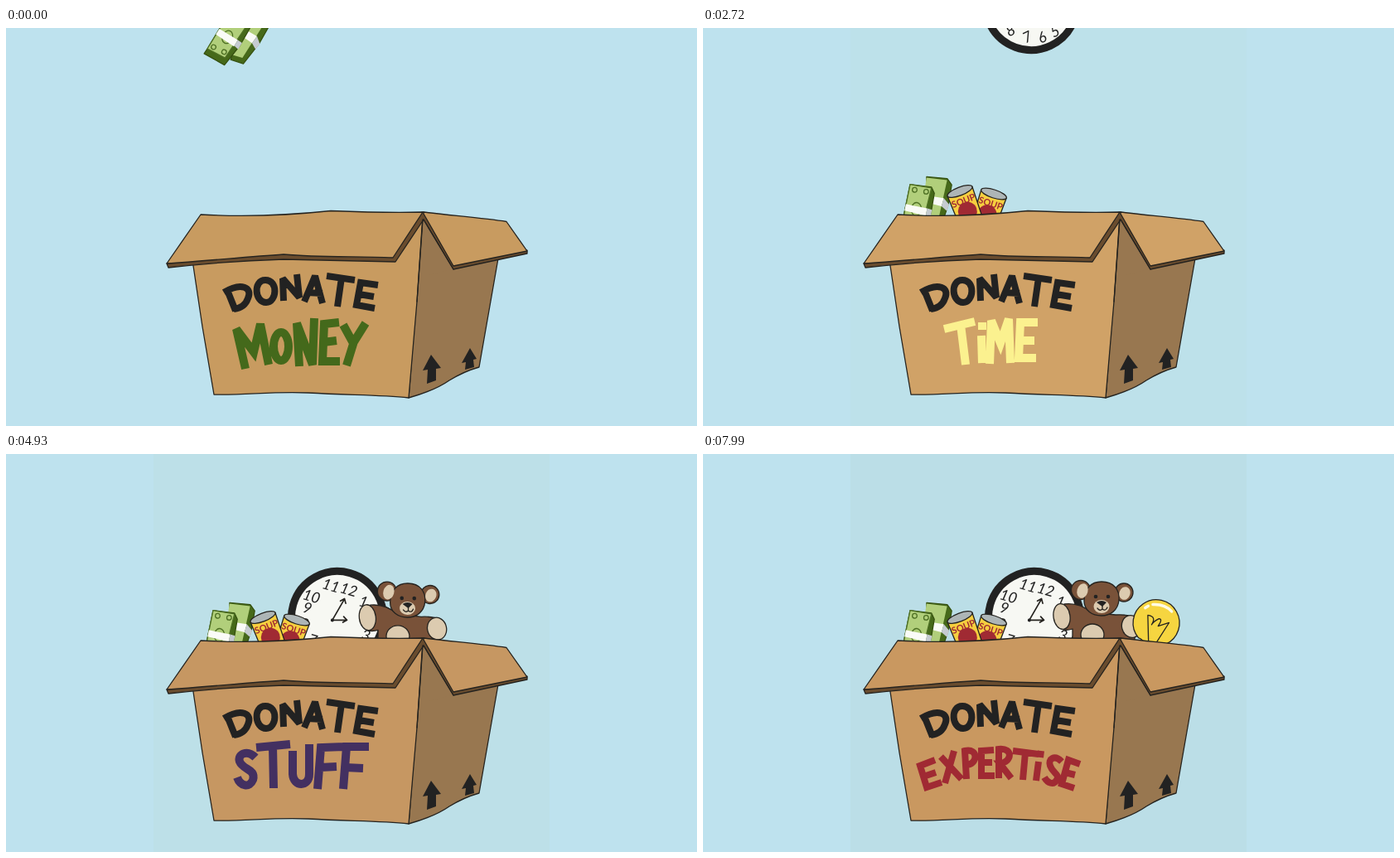
These frames come from a looping animation (834 by 480 pixels, 8160 ms). An HTML page:

```html
<!DOCTYPE html>
<html lang="en">
<head>
<meta charset="utf-8">
<title>Donate</title>
<style>
  html, body { margin: 0; width: 100%; height: 100%; overflow: hidden; background: #bee2ee; }
  svg { display: block; width: 834px; height: 480px; }
  .ink { stroke: #25231f; stroke-width: 1.3; stroke-linejoin: round; }
  .line { fill: none; stroke: #25231f; stroke-width: 1.3; stroke-linecap: round; stroke-linejoin: round; }
  .word { fill: none; stroke-linejoin: miter; stroke-miterlimit: 3; }
  .soup { font: 700 11px Lato, "Open Sans", sans-serif; fill: #a02a33; text-anchor: middle; }
  .digits { font: italic 400 18px Lato, "Open Sans", sans-serif; fill: #222; text-anchor: middle; }
</style>
</head>
<body>
<svg viewBox="0 0 834 480">
  <defs>
    <g id="can">
      <path class="ink" fill="#f6cf3f" d="M-16 0L-15 42Q0 49 14 43L16 0Z"/>
      <ellipse class="ink" cx="0" cy="0" rx="16" ry="5" fill="#adb5b6"/>
      <circle cx="0" cy="26" r="11.5" fill="#a02a33"/>
      <text class="soup" y="16">SOUP</text>
    </g>
  </defs>

  <rect width="834" height="480" fill="#bee2ee"/>
  <rect id="tint" x="178" width="478" height="480"/>

  <g id="money">
    <path class="ink" style="stroke:#35500f" fill="#46691a" d="M266 129L291 129L297 136L295 160L288 190L272 192Z"/>
    <path fill="#b1cf7b" d="M266 130L291 131L284 184L271 186L264 160Z"/>
    <path fill="#fafbf7" d="M276 152L289 153L287 163L275 161Z"/>
    <path fill="#c5cbd0" d="M289 153L296 160L294 168L287 163Z"/>
    <path class="ink" style="stroke:#35500f" fill="#46691a" d="M247 140L273 141L277 148L275 172L268 201L240 199L241 192Z"/>
    <path class="line" style="stroke:#4e7024;fill:#b1cf7b" d="M247 140L273 142L265 193L241 192Z"/>
    <g class="line" style="stroke:#4e7024">
      <circle cx="253" cy="146" r="2.8"/><circle cx="267" cy="147" r="2.8"/>
      <circle cx="247" cy="187" r="2.8"/><circle cx="261" cy="187" r="2.8"/>
      <ellipse cx="257" cy="169" rx="6" ry="8"/>
    </g>
    <path fill="#fafbf7" d="M244 164L270 167L269 176L243 172Z"/>
    <path fill="#c5cbd0" d="M270 167L276 168L275 177L269 175Z"/>
  </g>

  <g id="clock">
    <circle cx="398" cy="139" r="55.5" fill="#f7f8f3" stroke="#222" stroke-width="9"/>
    <g id="dial" class="digits"></g>
    <path class="line" style="stroke-width:1.7" d="M393 144L400 116M396 119L400 115L403 120M393 144L409 139M405 136L410 139L406 143"/>
    <circle cx="393" cy="144" r="2" fill="#222"/>
  </g>

  <use id="canRight" href="#can"/>
  <use id="canLeft" href="#can"/>

  <g id="bear">
    <g class="ink" fill="#795239">
      <path d="M436 181Q455 179 468 191L498 194Q514 193 521 198L521 236H446V211Q432 215 428 206Z"/>
      <circle cx="456" cy="164" r="11.5"/><circle cx="508" cy="167" r="11"/>
      <path d="M481 154C496 154 503 164 502 176C501 189 491 195 481 195C470 195 460 189 460 177C460 163 468 154 481 154Z"/>
    </g>
    <g fill="#dccbb0">
      <ellipse cx="458" cy="165" rx="6.5" ry="9" transform="rotate(15 458 165)"/>
      <ellipse cx="509" cy="168" rx="6.5" ry="8" transform="rotate(20 509 168)"/>
      <ellipse class="ink" cx="433" cy="196" rx="10" ry="15.5" transform="rotate(-8 433 196)"/>
      <ellipse class="ink" cx="517" cy="208" rx="11.5" ry="13.5" transform="rotate(-15 517 208)"/>
      <ellipse class="ink" cx="470" cy="218" rx="14" ry="13"/>
      <ellipse cx="481" cy="184" rx="9.5" ry="8"/>
    </g>
    <path fill="#222" d="M475 179Q481 175 487 179L482 184Z"/>
    <circle cx="474" cy="172" r="2.3" fill="#222"/><circle cx="489" cy="172" r="2.3" fill="#222"/>
    <path class="line" d="M482 183V187M476 186Q479 190 482 187Q486 190 488 185"/>
  </g>

  <g id="bulb">
    <path class="ink" fill="#3b3d3f" d="M-8 -27L-9 -42L-4 -48H4L9 -42L8 -27Z"/>
    <path class="line" style="stroke:#16181a" d="M-8 -40L9 -37M-8 -35L8 -32"/>
    <path class="ink" fill="#f6d540" d="M-8 -28Q-10 -23 -17 -22A28 28 0 1 0 17 -22Q10 -23 8 -28Q0 -31 -8 -28Z"/>
    <path class="line" d="M-4 -27L-15 4L-3 -3Q-7 7 -2 6Q4 1 5 -3Q1 8 12 7L3 -28"/>
    <path class="line" style="stroke:#fffbe4;stroke-width:3.5" d="M-15 18Q-5 25 9 21M14 18L17 15"/>
  </g>

  <g class="ink">
    <path fill="#987750" d="M503 226L594 278L571 409Q553 414 535 425Q518 437 486 446Z"/>
    <path class="card" d="M225 280L237 360L251 442C290 443 320 438 365 440C415 443 450 442 486 446L496 330L503 226Z"/>
    <path fill="#694c2e" d="M194 284L196 289C250 283 300 280 335 279C390 280 430 281 470 282L504 231L540 291L629 272L629 268L504 222Z"/>
    <path class="card" d="M235 225C290 228 340 226 392 220.500C430 222 470 223 503 222L467 277C420 275 380 277 335 273C290 276 240 281 194 284Z"/>
    <path class="card" d="M504 222C535 226 575 229 604 233.500L629 269L540 287L504 224Z"/>
  </g>
  <path fill="#987750" d="M503 233L538 291L503 300Z"/>
  <path class="line" d="M503 231L496 330M504 231L540 291"/>
  <path fill="#222" d="M513 394L525 410L519 411V425L508 429L509 412L503 413ZM560 386L568 399L564 400L565 409L554 412L555 403L550 404Z"/>

  <path class="word" stroke="#222" stroke-width="8" aria-label="DONATE" d="M263 319C284 306 298 313 292 326C289 335 283 338 275 339M267 316L277 341
    M313 304C329 304 327 331 314 331C300 331 298 304 313 304Z
    M335 329L334 302L354 325L351 297M360 330L373 299L382 332M363 319L382 320
    M387 299L421 304M405 301L400 336M449 310L428 307L423 334L445 338M426 321L444 324"/>
  <path id="word" class="word"/>
</svg>

<script>
const STEP = 170, STEPS = 48;
const byId = id => document.getElementById(id);

const ring = (x, y, rx, ry) => `M${x - rx} ${y}a${rx} ${ry} 0 1 1 ${2 * rx} 0a${rx} ${ry} 0 1 1 ${-2 * rx} 0Z`;

const scenes = [
  { start: 0, label: 'MONEY', color: '#44691b', width: 10, tint: '#bee2ee', card: '#c89b60',
    d: 'M289 411L278 363L299 391L307 357L317 406' + ring(332, 384, 9, 17) +
       'M354 408L351 356L370 406L372 350M402 355L384 357L382 402L403 402M383 379L399 377M407 358L419 380L434 356M420 378L411 407' },
  { start: 7, label: 'FOOD', color: '#5e9dac', width: 10, tint: '#bbe0e7', card: '#c79c64',
    d: 'M320 356L291 363M298 360L306 405M301 383L319 377' + ring(340, 377, 9.5, 22) + ring(371, 378, 9.5, 22) +
       'M393 405L394 356C422 355 421 398 388 401' },
  { start: 16, label: 'TIME', color: '#fbf18f', width: 10, tint: '#bde1ea', card: '#d0a267',
    d: 'M291 363L328 354M311 358L317 406M336 371L337 404M337 355L337 364M346 405L348 353L359 380L369 351L371 404M404 355L383 355L381 398L402 398M382 377L400 377' },
  { start: 24, label: 'STUFF', color: '#433061', width: 10, tint: '#bde0e8', card: '#c69762',
    d: 'M301 366C291 356 279 362 282 371C286 381 302 380 298 393C294 403 283 401 279 390M302 354L343 350M322 352L323 403M346 358L346 386C347 402 366 402 366 386L366 350M376 404L380 354L408 353M379 378L399 377M407 404L411 353L438 353M409 378L431 379' },
  { start: 33, label: 'EXPERTISE', color: '#a02a33', width: 8, tint: '#bbdee7', card: '#c99860',
    d: 'M280 369L262 376L270 402L288 396M266 389L281 384M287 365L312 392M303 358L292 397M318 392L316 358C333 354 332 375 317 375M351 357L336 358L336 388L352 388M336 372L349 372M357 391L357 356C375 354 373 372 358 373L372 391M374 358L405 362M389 360L386 393M405 371L402 394M408 358L407 366M433 371C424 362 416 368 419 376C422 385 431 386 427 393C423 400 416 397 412 390M455 374L441 369L433 398L448 403M437 384L449 387' }
];

// Poses are [step, x, y, angle]; rotation turns about each item's pivot.
const items = [
  { el: byId('money'), pivot: [241, 192], poses: [[0, 2, -167, 25], [4, 0, 0, 0], [5, -1, 38, 4], [6, -1.5, 48, 5]] },
  { el: byId('canLeft'), pivot: [0, 0], poses: [[7, 298, -11, -80], [11, 303, 157, -46], [12, 308, 190, -28], [13, 310, 197, -21]] },
  { el: byId('canRight'), pivot: [0, 0], poses: [[7, 340, -22, -12], [11, 346, 146, 5], [12, 350, 187, 14], [13, 351, 200, 18]] },
  { el: byId('clock'), pivot: [398, 139], poses: [[16, -2, -168, -25], [20, 0, 0, 0], [21, 1, 41, 11], [22, 2, 58, 16]] },
  { el: byId('bear'), pivot: [481, 215], poses: [[24, 6, -205, 12], [28, 4, -38, 4], [29, 3, 2, 1], [30, 0, 0, 0], [35, 0, 0, 0], [36, 0, 2, 0], [37, 0, 0, 0]] },
  { el: byId('bulb'), pivot: [0, 0], poses: [[33, 478, 8, -65], [36, 484, 134, -35], [37, 504, 119, 20], [38, 522, 127, 80], [39, 537, 158, 140], [40, 547, 204, 193]] }
];

const digitPlaces = [[423, 112], [433, 127], [437, 150], [425, 170], [410, 181], [393, 181], [377, 173], [362, 157], [360, 138], [361, 123], [380, 104], [402, 103]];
byId('dial').innerHTML = digitPlaces.map(([x, y], i) => `<text x="${x}" y="${y + 6.5}">${i + 1}</text>`).join('');

function poseAt(poses, step) {
  const next = poses.findIndex(p => p[0] > step);
  if (next < 0) return poses[poses.length - 1];
  if (next === 0) return null;
  const a = poses[next - 1], b = poses[next];
  const k = (step - a[0]) / (b[0] - a[0]);
  return a.map((v, i) => v + (b[i] - v) * k);
}

const cards = document.querySelectorAll('.card');

function render(step) {
  const scene = scenes.filter(s => s.start <= step).pop();
  const word = byId('word');
  word.setAttribute('d', scene.d);
  word.setAttribute('stroke', scene.color);
  word.setAttribute('stroke-width', scene.width);
  word.setAttribute('aria-label', scene.label);
  byId('tint').setAttribute('fill', scene.tint);
  cards.forEach(c => c.setAttribute('fill', scene.card));

  for (const { el, pivot, poses } of items) {
    const pose = poseAt(poses, step);
    el.style.display = pose ? '' : 'none';
    if (pose) el.setAttribute('transform', `translate(${pose[1]} ${pose[2]}) rotate(${pose[3]} ${pivot})`);
  }
}

const begin = performance.now();
function tick() {
  render(Math.floor((performance.now() - begin) / STEP) % STEPS);
  requestAnimationFrame(tick);
}
tick();
</script>
</body>
</html>
```
